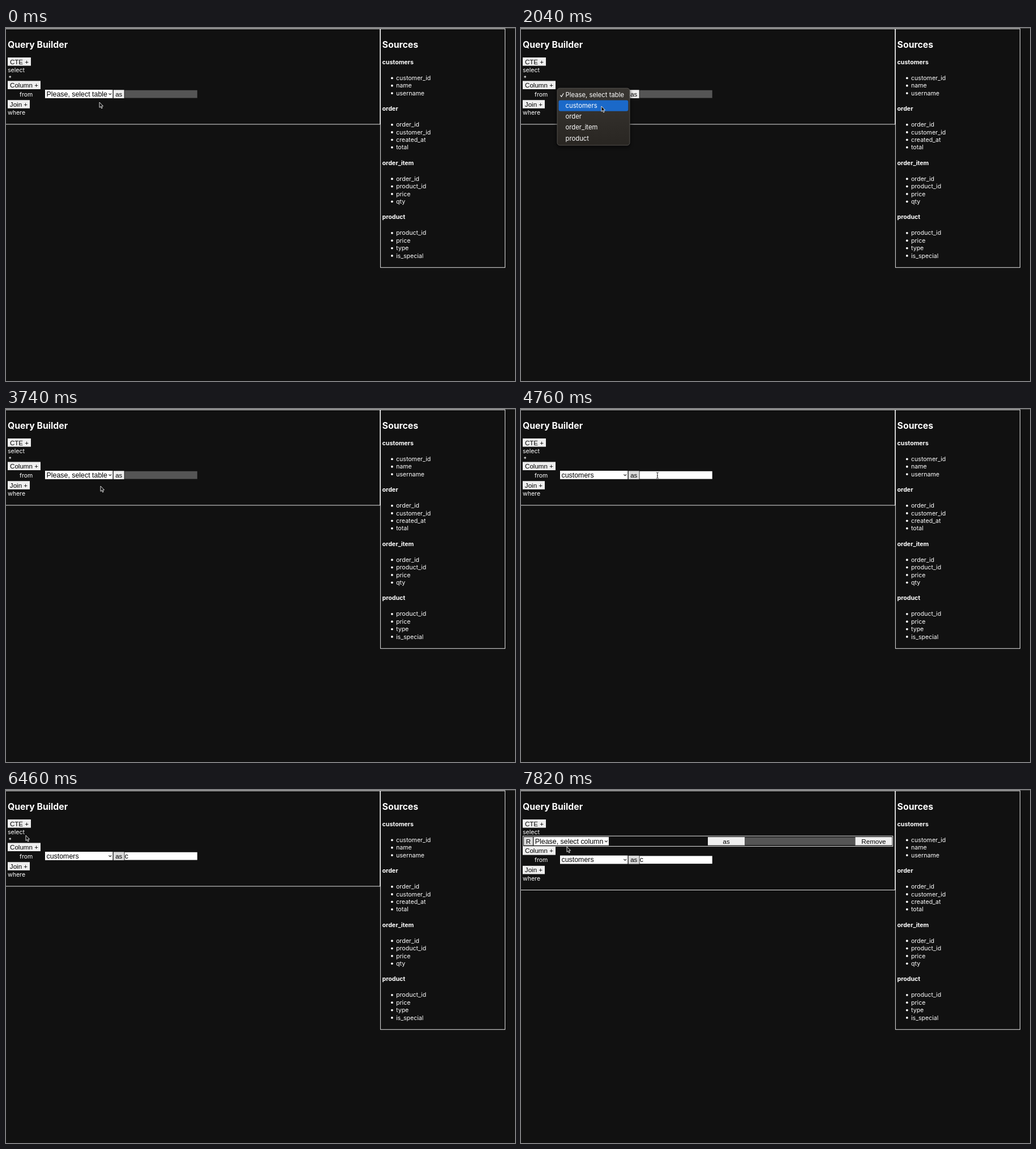
An HTML page for the animation above (7.99 s loop, 899 px wide and 623 px high).

```html
<!DOCTYPE html>
<html lang="en">
<head>
<meta charset="utf-8">
<title>Query Builder</title>
<style>
html, body { margin: 0; width: 100%; height: 100%; overflow: hidden; background: #111; }
svg { display: block; width: 100%; height: 100%; }
text { font: 10.6px Inter, sans-serif; fill: #fff; white-space: pre; }
.h2 { font-size: 15.8px; font-weight: 700; }
.h4 { font-weight: 700; }
.menu { font-size: 11.3px; }
.btn, .field { font-family: "Liberation Sans", Arial, sans-serif; fill: #000; }
.btn { font-size: 11.6px; }
.field { font-size: 12.4px; }
.line { fill: none; stroke: #e4e4e4; }
</style>
</head>
<body>
<svg id="stage" viewBox="0 0 899 623" xmlns="http://www.w3.org/2000/svg"></svg>
<script>
const STEP = 170, LOOP = 7990;
const GREY = '#efefef', DIM = '#dcdcdc', OFF = '#555';

const text = (x, y, s, cls = '', extra = '') => `<text x="${x}" y="${y}" class="${cls}" ${extra}>${s}</text>`;
const box = (x, y, w, h, fill, extra = '') => `<rect x="${x}" y="${y}" width="${w}" height="${h}" fill="${fill}" ${extra}/>`;
const group = (id, body) => `<g id="${id}">${body}</g>`;
const button = (x, y, w, s, fill = GREY, id = '') =>
  box(x, y, w, 14.6, fill, id && `id="${id}"`) +
  text(x + w / 2, y + 11.5, s, 'btn', 'text-anchor="middle"');
const select = (x, y, w, s) =>
  box(x, y, w, 14.8, '#fff') + text(x + 2.5, y + 11.8, s, 'field') +
  `<path d="M${x + w - 7} ${y + 6.4}l2.3 2.3 2.3-2.3" fill="none" stroke="#222" stroke-width="1.1"/>`;

const tables = [
  ['customers', 'customer_id', 'name', 'username'],
  ['order', 'order_id', 'customer_id', 'created_at', 'total'],
  ['order_item', 'order_id', 'product_id', 'price', 'qty'],
  ['product', 'product_id', 'price', 'type', 'is_special']
];

function sources() {
  let y = 64, out = text(664.6, 35, 'Sources', 'h2');
  for (const [name, ...columns] of tables) {
    out += text(664.6, y, name, 'h4');
    y += 28;
    for (const column of columns) {
      out += `<circle cx="681.8" cy="${y - 3.6}" r="1.9" fill="#fff"/>` + text(689, y, column);
      y += 13.35;
    }
    y += 14.2;
  }
  return out;
}

const menuRows = ['Please, select table', ...tables.map(t => t[0])]
  .map((s, i) => text(78.5, 122 + 19.15 * i, s, 'menu')).join('');

stage.innerHTML = `
<defs>
  <linearGradient id="panel" x2="0" y2="1"><stop stop-color="#393632"/><stop offset="1" stop-color="#292622"/></linearGradient>
  <filter id="soft" x="-20%" y="-20%" width="140%" height="150%"><feGaussianBlur stdDeviation="3"/></filter>
</defs>` +
  box(0, 0, 899, 623, '#111') + box(0, 0, 899, 1, '#4b4b4b') +
  '<rect id="left" class="line" x="-2" y="1.5" width="662.6" height="168.4"/>' +
  '<rect class="line" x="661.4" y="1.5" width="220" height="421.2"/>' +
  sources() +
  text(3, 35, 'Query Builder', 'h2') + button(3, 52, 41, 'CTE +') + text(3, 77.8, 'select') +
  group('star', text(4.5, 91.5, '*')) +
  group('row',
    '<rect class="line" x="3.5" y="81.2" width="653.2" height="18.2"/>' +
    button(5, 83, 16, 'R', DIM) + select(22.3, 82.9, 132.7, 'Please, select column') +
    button(330, 83, 65.3, 'as') + box(396, 83.4, 194, 13.8, OFF) + button(590.4, 83, 65, 'Remove')) +
  group('low',
    button(3, 93.4, 58, 'Column +', GREY, 'column') + text(24, 120.6, 'from') +
    button(3, 127.2, 39, 'Join +') + text(3, 153.2, 'where') +
    group('empty', select(69, 109, 119.5, 'Please, select table') +
      button(189.8, 109.3, 18.9, 'as') + box(209.5, 109.8, 128.3, 13.7, OFF)) +
    group('chosen', select(69, 109, 119.5, 'customers') +
      button(189.8, 109.3, 18.9, 'as', DIM) + box(209.5, 109.8, 128.3, 13.7, '#fff')) +
    group('alias', text(209.8, 120.8, 'c', 'field')) +
    group('caret', box(210.5, 111, .8, 11, '#000'))) +
  group('menu',
    box(63, 107, 130, 103, '#000', 'rx="6" opacity=".65" filter="url(#soft)"') +
    box(64, 106.2, 128, 100.8, 'url(#panel)', 'rx="4.5" stroke="#605d5a" stroke-width=".8"') +
    box(66.5, 108.4, 122.8, 19.1, '#1b69c9', 'id="mark" rx="3"') +
    '<path d="M69.5 118.6l2 2.7 3.7-6" fill="none" stroke="#fff" stroke-width="1.2"/>' + menuRows) +
  group('pointer',
    '<g id="ring"><circle r="13" fill="#888" fill-opacity=".12" stroke="#222" stroke-opacity=".5" stroke-width="2.4"/>' +
    '<circle r="13" fill="none" stroke="#ddd" stroke-opacity=".75"/></g>' +
    '<path id="arrow" d="M0 0V9.4L2.1 7.5 3.6 10.9 5.2 10.2 3.7 6.9H6.6Z" fill="#111" stroke="#eee" stroke-width=".9" stroke-linejoin="round"/>' +
    '<path id="beam" d="M-2-5Q0-5 0-3.8Q0-5 2-5M0-3.8V4.2M-2 5.2Q0 5.2 0 4.2Q0 5.2 2 5.2M-1 .9H1" fill="none" stroke="#111" stroke-width=".9"/>');

// Pointer path: time, x, y
const path = [
  [0, 165, 131], [170, 142, 118], [680, 142, 118], [850, 149, 118], [1020, 149, 118],
  [1360, 151, 124], [1700, 147, 135], [2040, 142, 138], [2210, 141, 139], [2380, 140, 139.5],
  [2720, 138, 140], [3400, 138, 140], [3570, 156, 139], [3740, 167, 136], [4080, 184, 128],
  [4250, 201, 118], [4420, 222, 117], [4590, 236, 117], [4760, 241, 117], [5440, 241, 117],
  [5610, 248, 130], [5780, 240, 158], [5950, 190, 162], [6120, 125, 137], [6290, 64, 98],
  [6460, 35, 80], [6630, 36, 83], [6800, 42, 97], [6970, 44, 101], [7650, 45, 102], [7820, 81, 100], [LOOP, 81, 100]
];

function pointerAt(t) {
  const i = Math.max(1, path.findIndex(p => p[0] >= t));
  const [t0, x0, y0] = path[i - 1], [t1, x1, y1] = path[i];
  const k = (t - t0) / (t1 - t0);
  return [x0 + (x1 - x0) * k, y0 + (y1 - y0) * k];
}

const $ = id => document.getElementById(id);
const show = (id, on) => $(id).setAttribute('visibility', on ? 'visible' : 'hidden');
const move = (id, x, y) => $(id).setAttribute('transform', `translate(${x} ${y})`);

function draw(t) {
  const during = (from, to) => t >= from && t < to;
  const added = t >= 7140, chosen = t >= 4420;

  $('menu').style.display = during(340, 3570) ? '' : 'none';
  move('mark', 0, t >= 1530 ? 19.15 : 0);
  show('mark', !during(3400, 3570));

  show('empty', !chosen);
  show('chosen', chosen);
  show('alias', t >= 5270);
  show('caret', during(4930, 5270));

  show('row', added);
  show('star', !added);
  move('low', 0, added ? 6.6 : 0);
  $('left').setAttribute('height', added ? 175 : 168.4);
  $('column').setAttribute('fill', during(6800, 7820) ? DIM : GREY);

  const beam = during(4420, 5610);
  show('beam', beam && !during(5270, 5610));
  show('arrow', !beam);
  show('ring', during(340, 510) || during(3230, 3400) || during(4930, 5100) || during(6970, 7140));
  move('pointer', ...pointerAt(t));
}

function tick(now) {
  draw(Math.floor(now % LOOP / STEP) * STEP);
  requestAnimationFrame(tick);
}
draw(0);
requestAnimationFrame(tick);
</script>
</body>
</html>
```
